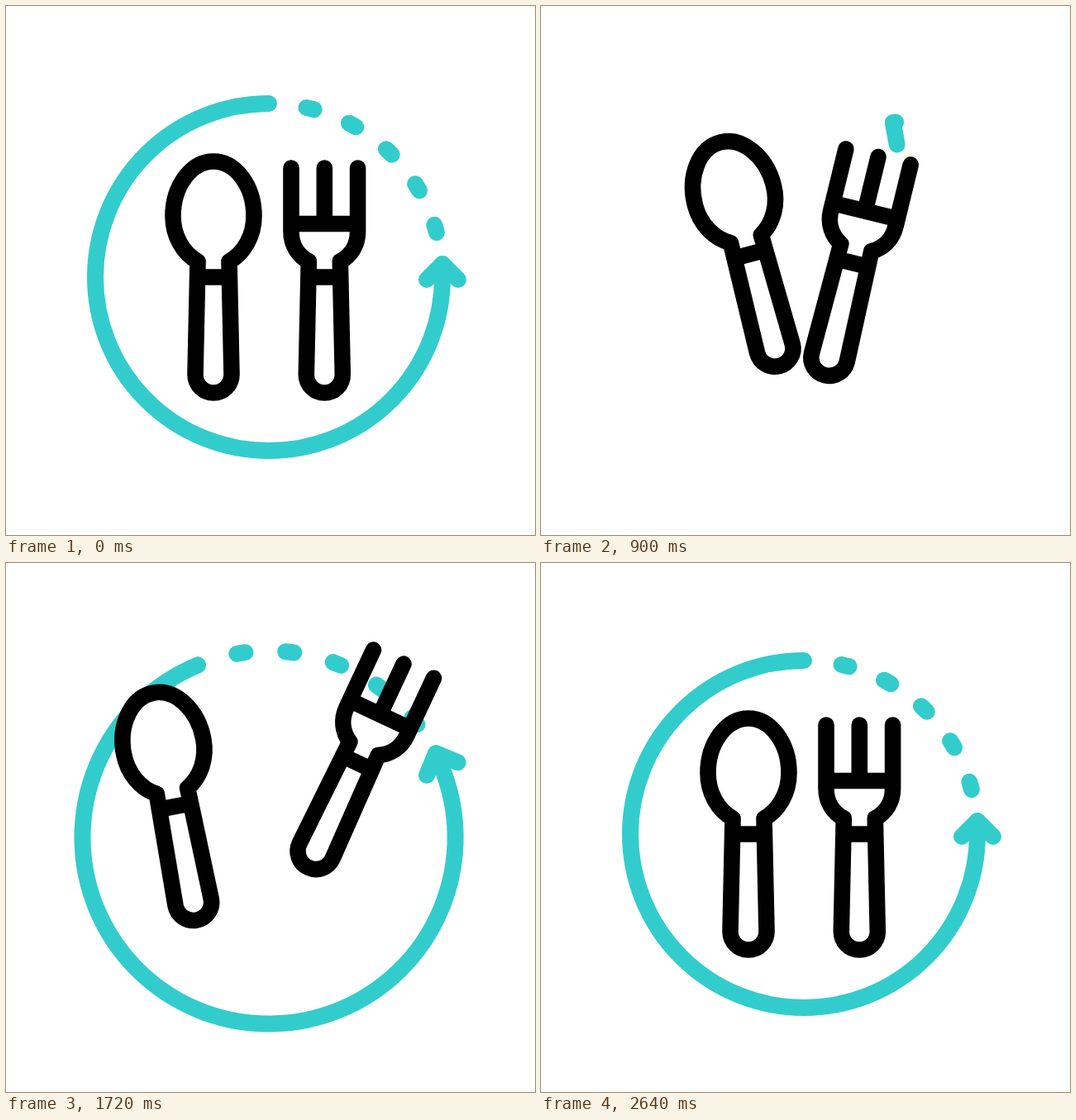
Animation of 640 by 640 pixels, one loop 3600 ms. Source, as an HTML page with a canvas:

```html
<!DOCTYPE html>
<html lang="en">
<head>
<meta charset="utf-8">
<title>Meal time</title>
<style>
  html, body { margin: 0; height: 100%; overflow: hidden; background: #fff; }
  canvas { display: block; }
</style>
</head>
<body>
<canvas id="stage" width="640" height="640"></canvas>
<script>
const ctx = document.getElementById('stage').getContext('2d');
const LOOP = 3600, SETTLED = 2640, RADIUS = 210, RAD = Math.PI / 180;

// Timing helpers: progress within a span, eased steps and a single sine hump.
const progress = (t, from, to) => Math.min(1, Math.max(0, (t - from) / (to - from)));
const smooth = (t, from, to) => { const u = progress(t, from, to); return u * u * (3 - 2 * u); };
const cubic = (t, from, to) => {
  const u = progress(t, from, to);
  return u < 0.5 ? 4 * u ** 3 : 1 - 4 * (1 - u) ** 3;
};
const hump = (t, from, to) => Math.sin(Math.PI * progress(t, from, to));

// Closed outlines, symmetric around x = 0.
const handle = 'L-22 446A22 22 0 0 0 22 446L19 309';
const collar = 'M-18 328H18';
const spoonBody = 'M-19 309' + handle +
  'C37 299 49 278 49 254C49 218 27 188 0 188S-49 218 -49 254C-49 278 -37 299 -19 309Z';
const forkBody = 'V273C-40.3 289 -32 302 -19 309' + handle + 'C32 302 40.3 289 40.3 273V';

const spoon = {
  fill: new Path2D(spoonBody),
  line: new Path2D(spoonBody + collar),
  x: 251, y: 348, side: -1, tilt: 31, lift: 97,
  rise: [600, 1440], fall: [1450, 1900], bounceTilt: -3.4, bounceDrop: 0
};
const fork = {
  fill: new Path2D('M-40.3 263.5' + forkBody + '263.5Z'),
  line: new Path2D('M-40.3 196' + forkBody + '196M0 196V263M-40.3 263.5H40.3' + collar),
  x: 385.3, y: 321, side: 1, tilt: 28.7, lift: 98,
  rise: [670, 1540], fall: [1610, 2110], bounceTilt: -1.8, bounceDrop: 5
};

const segment = (x1, y1, x2, y2) => ({
  length: Math.hypot(x2 - x1, y2 - y1),
  draw(share) {
    ctx.moveTo(x1, y1);
    ctx.lineTo(x1 + (x2 - x1) * share, y1 + (y2 - y1) * share);
  }
});
const arc = (start, sweep) => ({
  length: RADIUS * sweep * RAD,
  draw(share) {
    ctx.moveTo(RADIUS * Math.cos(start * RAD), RADIUS * Math.sin(start * RAD));
    ctx.arc(0, 0, RADIUS, start * RAD, (start + sweep * share) * RAD);
  }
});

// Arrow head, long arc and dashes are drawn one after another.
const pieces = [segment(191, 3, 210, -16), segment(210, -16, 229, 3), arc(0, 270)];
for (let i = 0; i < 5; i++) pieces.push(arc(-77.5 + 15 * i, 2.6));
const total = pieces.reduce((sum, p) => sum + p.length, 0);

// One full turn: an accelerating wind-up, then a damped swing into place.
function ringAngle(t) {
  if (t < 1132) return -55 * (Math.max(0, t - 80) / 820) ** 5.74;
  const s = t - 1443;
  return -360 - 51 * Math.exp(-0.00294 * s) * Math.sin(Math.PI * s / 598.5);
}

function drawRing(t) {
  const scale = 1 - 0.25 * hump(t, 934, 1648) + 0.12 * hump(t, 1648, 1992);
  const drift = hump(t, 570, 1230);
  let left = total * (1 - cubic(t, 540, 986) + cubic(t, 986, 1400));
  ctx.save();
  ctx.translate(327.7 - 2.5 * drift, 328 - 13 * drift);
  ctx.rotate(ringAngle(t) * RAD);
  ctx.scale(scale, scale);
  ctx.translate(-9.7, 0);
  ctx.lineWidth = 20 / scale;
  ctx.strokeStyle = '#33cccc';
  for (const piece of pieces) {
    if (left <= 0) break;
    ctx.beginPath();
    piece.draw(Math.min(1, left / piece.length));
    ctx.stroke();
    left -= piece.length;
  }
  ctx.restore();
}

function drawUtensil(u, t) {
  const stay = 1 - smooth(t, ...u.fall);
  const bounce = hump(t, 2000, SETTLED);
  const shift = 43 * hump(t, 1340, 2160) - 7 * hump(t, 560, 1340);
  const lift = u.lift * smooth(t, ...u.rise) * stay;
  const tilt = u.side * u.tilt * smooth(t, 280, 1560) * stay + u.bounceTilt * bounce;
  ctx.save();
  ctx.translate(u.x + u.side * shift, u.y - lift + u.bounceDrop * bounce);
  ctx.rotate(tilt * RAD);
  ctx.translate(0, -u.y);
  ctx.lineWidth = 19.6;
  ctx.strokeStyle = '#000';
  ctx.fillStyle = '#fff';
  ctx.fill(u.fill);
  ctx.stroke(u.line);
  ctx.restore();
}

function frame() {
  const t = Math.min(SETTLED, performance.now() % LOOP);
  ctx.fillStyle = '#fff';
  ctx.fillRect(0, 0, 640, 640);
  ctx.lineCap = ctx.lineJoin = 'round';
  drawRing(t);
  drawUtensil(spoon, t);
  drawUtensil(fork, t);
  requestAnimationFrame(frame);
}
frame();
</script>
</body>
</html>
```
